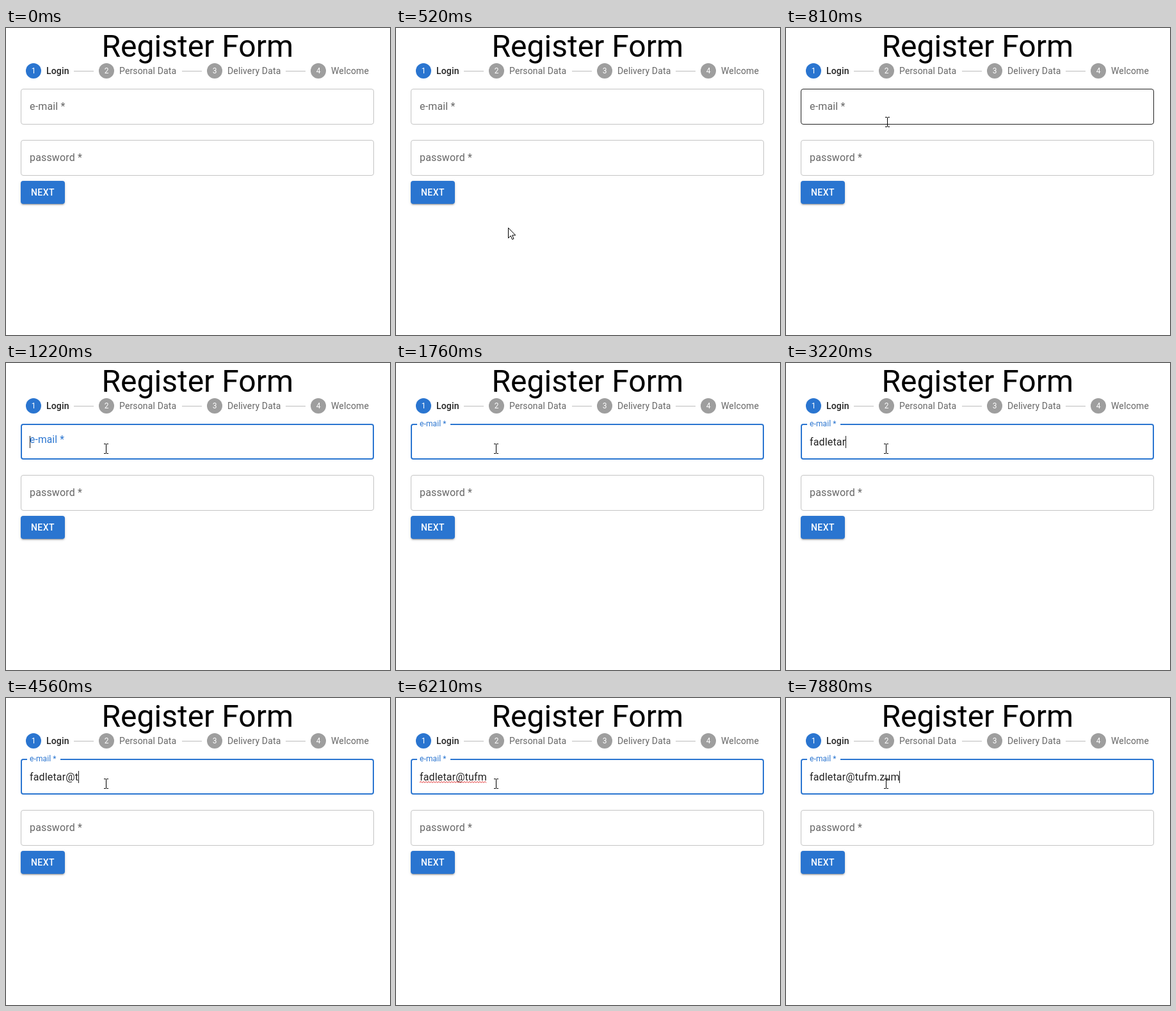
An HTML page for the animation above (8000 ms loop, 600x480 px).

```html
<!DOCTYPE html>
<html lang="en">
<head>
<meta charset="utf-8">
<title>Register Form</title>
<style>
  html, body { margin: 0; width: 100%; height: 100%; overflow: hidden; background: #fff; }
  body { position: relative; font-family: Roboto, sans-serif; }
  svg { position: absolute; left: 0; top: 0; display: block; }
  text { letter-spacing: .15px; fill: rgba(0, 0, 0, .6); font-size: 16px; }
  .title { font-size: 48px; letter-spacing: 0; fill: #000; }
  .step { font-size: 14px; }
  .step.on { font-weight: 500; fill: rgba(0, 0, 0, .87); }
  .num { font-size: 12px; letter-spacing: 0; fill: #fff; text-anchor: middle; }
  #typed, #caret { fill: rgba(0, 0, 0, .87); }
  .box { fill: none; }
  .next {
    position: absolute; left: 23px; top: 239px; width: 69px; height: 36px;
    box-sizing: border-box; padding-left: 16px; border-radius: 4px;
    background: #2a75d0; color: #fff; font-size: 14px; font-weight: 500;
    letter-spacing: .4px; line-height: 36px; white-space: nowrap;
    box-shadow: 0 3px 1px -2px rgba(0, 0, 0, .2), 0 2px 2px rgba(0, 0, 0, .14), 0 1px 5px rgba(0, 0, 0, .12);
  }
</style>
</head>
<body>
<div class="next">NEXT</div>
<svg width="600" height="480" viewBox="0 0 600 480">
  <text class="title" x="149.5" y="45">Register Form</text>
  <g id="steps"></g>
  <rect class="box" id="mailBox"/>
  <rect class="box" id="passBox"/>
  <rect id="notch" x="33" y="94" height="4" fill="#fff"/>
  <text id="label">e-mail *</text>
  <text x="37" y="208">password *</text>
  <text id="typed" x="37" y="129"></text>
  <path id="wave" fill="none" stroke="#e02020" stroke-width="1"/>
  <rect id="caret" y="114" width="1" height="19"/>
  <path id="beam" d="M-3-8h3v1h1v-1h3v1h-3v14h3v1h-3v-1h-1v1h-3v-1h3v-14h-3z" fill="#000"/>
  <path id="arrow" d="M.5.5v16l3.7-3.6 2.4 5.6 2.4-1-2.4-5.5h5.1z" fill="#fff" stroke="#000"/>
</svg>
<script>
const LOOP = 8000, FOCUS = 1160, BLINK = 530;
const BLUE = '#2a75d0', MAIL = 'fadletar@tufm.zum';
const keys = [2090, 2220, 2420, 2620, 2750, 2950, 3080, 3220, 4160,
              4560, 4760, 4890, 5210, 6270, 6540, 6670, 6810];
const caretOn = [1220, ...keys, 7880];
const checks = [[6210, 6270], [7810, 7880]];

// pointer positions, one per 70 ms tick from 250 ms
const pointer = [[186, 468], [183, 422], [179, 368], [175, 312], [171, 262], [167, 220],
                 [163, 190], [160, 164], [158, 147], [157, 140], [156, 136], [156, 134]];

const $ = id => document.getElementById(id);
const set = (el, attrs) => { for (const k in attrs) el.setAttribute(k, attrs[k]); };
const show = (el, on) => { el.style.display = on ? '' : 'none'; };

$('steps').innerHTML = [['Login', 31], ['Personal Data', 145], ['Delivery Data', 314], ['Welcome', 476]]
  .map(([name, x], i) =>
    (i ? `<rect x="${x - 39}" y="67" width="31" height="1" fill="#bdbdbd"/>` : '') +
    `<circle cx="${x + 12}" cy="67" r="12" fill="${i ? '#9e9e9e' : BLUE}"/>` +
    `<text class="num" x="${x + 12}" y="71">${i + 1}</text>` +
    `<text class="step${i ? '' : ' on'}" x="${x + 32}" y="72">${name}</text>`).join('');

function outline(el, top, state) {
  const w = state === 'focus' ? 2 : 1;
  set(el, {
    x: 23 + w / 2, y: top + w / 2, width: 552 - w, height: 56 - w, rx: 4 - w / 2,
    'stroke-width': w, stroke: { idle: '#c4c4c4', hover: '#212121', focus: BLUE }[state]
  });
}

function squiggle(width) {
  let d = 'M37 132';
  for (let x = 2; x <= width; x += 2) d += `L${37 + x} ${x % 4 ? 130.5 : 132.5}`;
  return d;
}

function drawPointer(t) {
  const i = Math.min(Math.floor((t - 250) / 70), pointer.length - 1);
  if (i < 0) {
    show($('beam'), false);
    show($('arrow'), false);
    return '';
  }
  const [x, y] = pointer[i];
  const over = y >= 95 && y < 151 ? 'mail' : y >= 175 && y < 231 ? 'pass' : '';
  show($('beam'), over);
  show($('arrow'), !over);
  set($(over ? 'beam' : 'arrow'), { transform: `translate(${x} ${y})` });
  return over;
}

function drawLabel(t) {
  const tick = FOCUS + Math.floor((t - FOCUS) / 65) * 65;
  const p = Math.max(0, Math.min(1, (tick - FOCUS + 10) / 250));
  const e = t < FOCUS ? 0 : 1 - (1 - p) ** 2.5;
  set($('label'), { transform: `translate(37 ${128 - 29.25 * e}) scale(${1 - .25 * e})` });
  $('label').style.fill = t < FOCUS ? '' : BLUE;
  set($('notch'), { width: 52 * Math.max(0, Math.min(1, (tick - FOCUS - 40) / 60)) });
}

function render(t) {
  const over = drawPointer(t), focused = t >= FOCUS;
  outline($('mailBox'), 95, focused ? 'focus' : over === 'mail' ? 'hover' : 'idle');
  outline($('passBox'), 175, over === 'pass' ? 'hover' : 'idle');
  drawLabel(t);

  const text = MAIL.slice(0, keys.filter(k => k <= t).length);
  if ($('typed').textContent !== text) $('typed').textContent = text;
  const width = text ? $('typed').getComputedTextLength() : 0;
  set($('caret'), { x: Math.floor(37 + width) });
  show($('caret'), caretOn.some(k => t >= k && t < k + BLINK));

  const checked = checks.some(([a, b]) => t >= a && t < b);
  show($('wave'), checked);
  if (checked) set($('wave'), { d: squiggle(width) });
}

const start = performance.now();
function loop(now) {
  render(Math.max(0, now - start) % LOOP);
  requestAnimationFrame(loop);
}
render(0);
requestAnimationFrame(loop);
</script>
</body>
</html>
```
